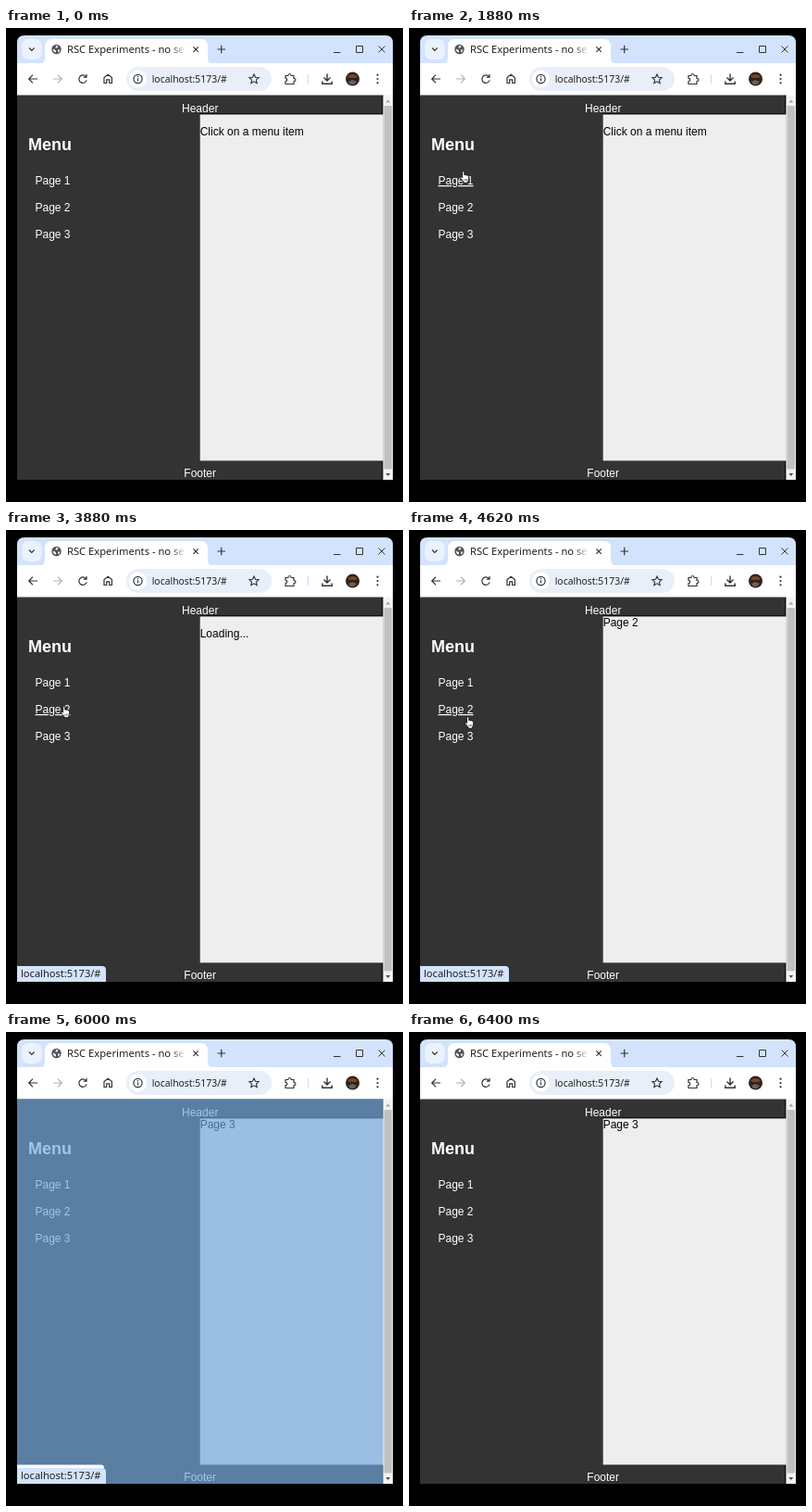
An HTML page for the animation above (7080 ms loop, 429 by 512 pixels).

```html
<!DOCTYPE html>
<html lang="en">
<head>
<meta charset="utf-8">
<title>Menu navigation</title>
<style>
  html, body { margin: 0; width: 100%; height: 100%; overflow: hidden; background: #000; }
  svg { display: block; width: 429px; height: 512px; }
  text { white-space: pre; }
  .ui { font-family: "Noto Sans", "Open Sans", sans-serif; fill: #1f1f1f; }
  .page { font: 12px "Liberation Sans", Arial, sans-serif; fill: #fff; }
  .body { fill: #000; }
  .line { fill: none; stroke: #333; stroke-width: 1.2; }
</style>
</head>
<body>
<svg viewBox="0 0 429 512">
  <defs>
    <linearGradient id="fade">
      <stop offset="0" stop-color="#fff" stop-opacity="0"/>
      <stop offset=".8" stop-color="#fff"/>
    </linearGradient>
  </defs>

  <!-- tab strip -->
  <path d="M12 40V16q0-8 8-8h390q8 0 8 8v24z" fill="#d3e3fd"/>
  <rect x="17" y="12" width="21.5" height="22" rx="7" fill="#ebf2fe"/>
  <path d="M36 38.500q6 0 6-6V20q0-8 8-8h160q8 0 8 8v12.500q0 6 6 6z" fill="#fff"/>
  <path class="line" d="M25 21.500l2.800 2.800 2.800-2.800"/>
  <circle cx="54.500" cy="23" r="5.200" fill="#505357"/>
  <path d="M50.800 22.500l3 1.500v2.700q-3-1-3-4.200M54 19l2.200.3-.5 2-2.200.5zM56 23.500h2.300q-.3 2-2 3z" fill="#fff"/>
  <text class="ui" x="66" y="27" font-size="11.2">RSC Experiments - no ser</text>
  <rect x="178" y="14" width="20" height="18" fill="url(#fade)"/>
  <g class="line">
    <path d="M202.400 20.400l5.400 5.400m0-5.400l-5.400 5.400M228.500 23h8.500m-4.250-4.250v8.500"/>
    <path d="M354 26.500h7.500M378.500 19.500h7v7h-7zM402.500 19.500l7 7m0-7l-7 7" stroke-width="1"/>
  </g>

  <!-- toolbar -->
  <rect x="12" y="38" width="406" height="35" fill="#fff"/>
  <rect x="130" y="42" width="157" height="26" rx="13" fill="#e9eff9"/>
  <circle cx="142.500" cy="55" r="9.500" fill="#fff"/>
  <g class="line">
    <path d="M34 55H24.700M29 50.700L24.700 55l4.300 4.300"/>
    <path d="M51 55h9.300M56 50.700l4.300 4.300-4.300 4.300" stroke="#b0b2b5"/>
    <path d="M86.200 52.300a4.200 4.200 0 1 0 .9 4M87 50v3.200h-3.200"/>
    <path d="M106 59.500v-6l4.200-3.300 4.200 3.300v6h-2.700v-3.700h-3v3.700z"/>
    <circle cx="142.500" cy="55" r="4.600"/>
    <path d="M142.500 54.300v3.200m0-5.400v1.200"/>
    <path d="M268 50l1.500 3.300 3.600.4-2.700 2.400.8 3.600-3.200-1.900-3.200 1.900.8-3.600-2.700-2.400 3.600-.4z" stroke-width="1.100"/>
    <path d="M302 51.500h2.800q.2-2 1.700-2t1.700 2h2.800v2.800q2 .2 2 1.700t-2 1.700v2.800h-9v-2.800q1.800-.2 1.800-1.700t-1.800-1.700z"/>
    <path d="M326.500 50v10" stroke="#c9dcfb"/>
    <path d="M347 49.500v7.500m-3.500-3.500l3.500 3.500 3.500-3.500M341.800 57.500v2.800h10.400v-2.800" stroke-width="1.400"/>
  </g>
  <text class="ui" x="157.700" y="59" font-size="10.400">localhost:5173/#</text>
  <circle cx="374.500" cy="55" r="7.500" fill="#30221c"/>
  <path d="M369 52q5.500-4 11 0l-2 2h-7z" fill="#7b431f"/>
  <path d="M370 58l4-2 5 2-3 3h-4z" fill="#69605c"/>
  <g fill="#333">
    <circle cx="401.500" cy="50.700" r="1.100"/><circle cx="401.500" cy="55" r="1.100"/><circle cx="401.500" cy="59.300" r="1.100"/>
  </g>

  <!-- web page -->
  <rect x="12" y="72.500" width="396" height="415.500" fill="#333"/>
  <path d="M209.700 92.500H406.500V73M209.700 467.500H406.500V488" fill="none" stroke="#111"/>
  <rect x="209.700" y="93.500" width="198" height="374" fill="#eee"/>
  <g class="page">
    <text x="209.700" y="91" text-anchor="middle">Header</text>
    <text x="209.700" y="485" text-anchor="middle">Footer</text>
    <text x="24" y="132" font-size="18" font-weight="bold">Menu</text>
    <text class="link" x="31.500" y="169">Page 1</text>
    <text class="link" x="31.500" y="198">Page 2</text>
    <text class="link" x="31.500" y="227">Page 3</text>
    <g class="body">
      <text id="heading" x="209.700" y="131" font-size="24" font-weight="bold">Title</text>
      <text id="content" x="209.700"></text>
    </g>
  </g>
  <rect id="overlay" x="12" y="72.500" width="395.500" height="415.500" fill="#6fa8dc" fill-opacity=".66"/>

  <!-- scrollbar -->
  <rect x="407.500" y="72.500" width="10.500" height="415.500" fill="#f3f3f3"/>
  <rect x="408.500" y="84" width="8.500" height="392.500" fill="#c1c1c1"/>
  <path d="M410.300 80.500l2.500-3 2.500 3z" fill="#a3a3a3"/>
  <path d="M410.300 481l2.500 3 2.500-3z" fill="#505050"/>

  <path id="edge" d="M12 471v-3.500h91q3 0 3 3.500z" fill="#fff"/>
  <g id="status">
    <path d="M12 488v-17h92q4 0 4 4v13z" fill="#d3e3fd"/>
    <text class="ui" x="16" y="483" font-size="11.100">localhost:5173/#</text>
  </g>

  <path id="arrow" d="M0 0v10.500l2.400-2.200 1.800 4 1.900-.8-1.800-3.900h3.400z" fill="#000" stroke="#fff" stroke-width=".8"/>
  <g id="hand">
    <path d="M2.600 1.300q1.200-1.300 2.200 0v3.400q1-.6 1.700.2 1-.5 1.600.4 1.300-.3 1.500 1v3q-.2 1.700-1 2.600v1.300H3.900v-1.300L.6 8q-.3-1.500 1-1.300l1 1z" fill="#fff" stroke="#000" stroke-width=".8"/>
    <path d="M4.900 9v2.200m1.500-2.200v2.200m1.500-2.200v2.200" stroke="#000" stroke-width=".5"/>
  </g>
</svg>
<script>
const LOOP = 7080, STEP = 80;
const $ = id => document.getElementById(id);
const links = document.querySelectorAll('.link');
const show = (el, on) => el.setAttribute('visibility', on ? 'visible' : 'hidden');
const clamp = v => Math.max(0, Math.min(1, v));

// pointer path: time, x, y
const path = [
  [840, 400, 296], [1160, 215, 205], [1490, 20, 123], [1580, 27, 129],
  [1880, 55, 154], [2040, 50, 161], [2760, 55, 161], [3260, 55, 161],
  [3500, 71, 174], [3720, 58, 190], [3880, 59, 189.5], [4540, 59, 189.5],
  [4620, 60, 201], [4780, 60, 217.5], [4940, 55, 217.5],
  [5930, 405, 217], [6000, 405, 217]
];
// points that are reached by a jump after a rest
const jumps = [2760, 4620, 4940, 5930];

// content: time, text, baseline
const views = [
  [0, 'Click on a menu item', 116], [2760, 'Loading...', 116], [3080, 'Page1', 163],
  [3880, 'Loading...', 116], [4200, 'Page 2', 104],
  [5110, 'Loading...', 116], [5450, 'Page 3', 104]
];

function pointerAt(t) {
  const i = path.findIndex(p => p[0] > t);
  if (i < 1) return null;
  const [t0, x0, y0] = path[i - 1], [t1, x1, y1] = path[i];
  const k = jumps.includes(t1) ? 0 : Math.floor((t - t0) / STEP) * STEP / (t1 - t0);
  return { x: x0 + (x1 - x0) * k, y: y0 + (y1 - y0) * k };
}

function draw(t) {
  const p = pointerAt(t);
  const hovered = p && p.x < 100 && p.y > 150 ? Math.floor((p.y - 151) / 29) : -1;
  links.forEach((a, i) => a.setAttribute('text-decoration', i === hovered ? 'underline' : 'none'));
  show($('hand'), p && hovered >= 0);
  show($('arrow'), p && hovered < 0);
  if (p) for (const id of ['hand', 'arrow']) $(id).setAttribute('transform', `translate(${p.x} ${p.y})`);

  const [start, label, baseline] = views.findLast(v => v[0] <= t);
  $('content').textContent = label;
  $('content').setAttribute('y', baseline);
  show($('heading'), start === 3080);

  const inspecting = t >= 6000 && t < 6090;
  show($('overlay'), inspecting);
  show($('edge'), inspecting);
  const opacity = t < 4000 ? (t - 2060) / 220 : (6400 - t) / 200;
  $('status').setAttribute('opacity', clamp(opacity));
}

const origin = performance.now();
function tick() {
  draw((performance.now() - origin) % LOOP);
  requestAnimationFrame(tick);
}
tick();
</script>
</body>
</html>
```
